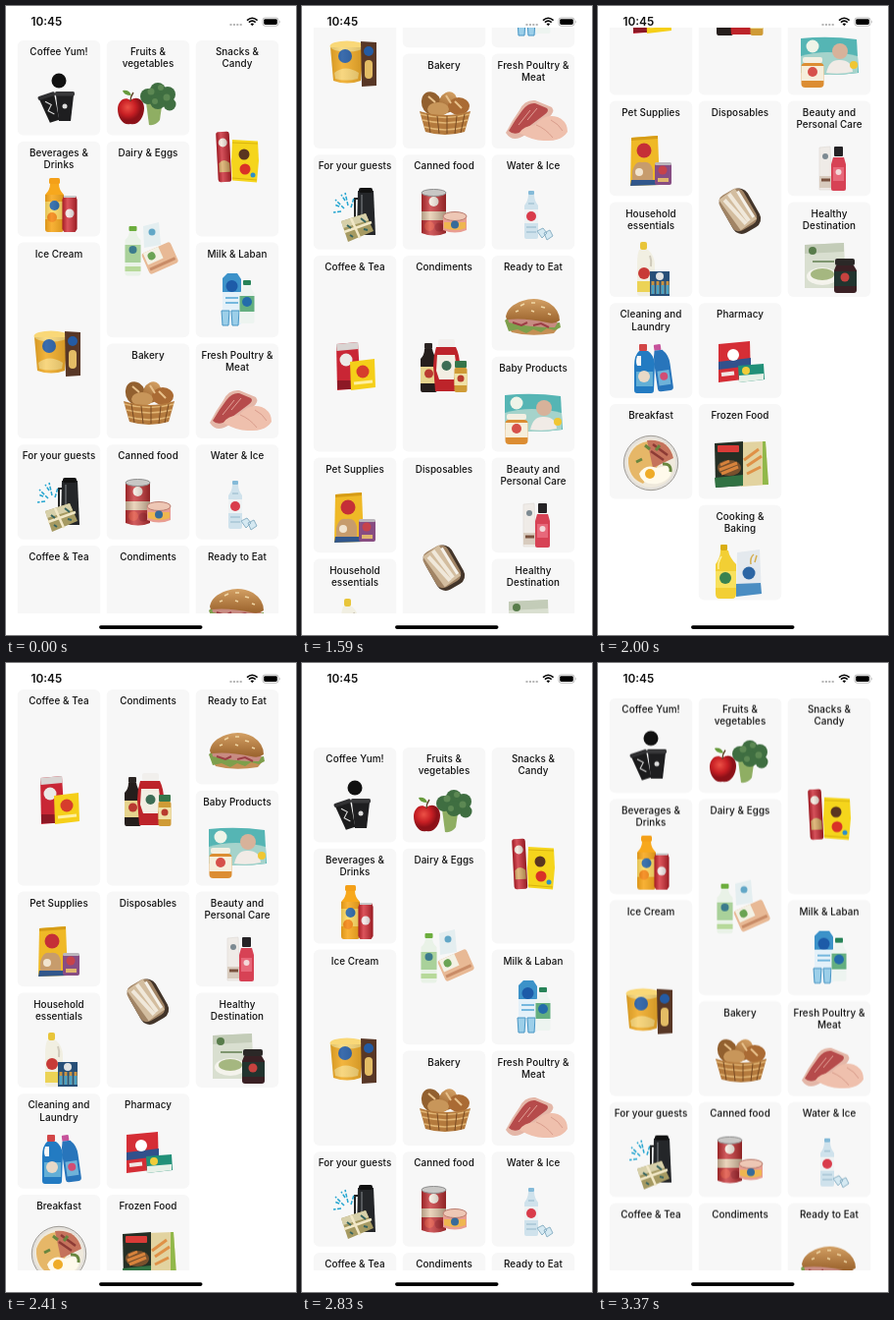
These frames come from a looping animation (296 px wide and 640 px high, 3490 ms). An HTML page:

```html
<!DOCTYPE html>
<html lang="en">
<head>
<meta charset="utf-8">
<title>Grocery categories</title>
<style>
html, body { margin: 0; width: 100%; height: 100%; overflow: hidden; background: #fff; }
svg { display: block; width: 296px; height: 640px; }
text { font-family: Inter, Roboto, sans-serif; fill: #111; }
#cards text { font-size: 9.9px; font-weight: 500; letter-spacing: .08px; text-anchor: middle; }
#cards rect { fill: #f7f7f7; }
#list { animation: scroll 3490ms step-end infinite; }
/* fling down, settle at the end, fling back past the top, spring home */
@keyframes scroll {
  0% { transform: translateY(0); }
  39.25% { transform: translateY(-12px); }
  42.4% { transform: translateY(-135px); }
  45.27% { transform: translateY(-295px); }
  48.42% { transform: translateY(-425px); }
  51.57% { transform: translateY(-528px); }
  54.44% { transform: translateY(-606px); }
  57.3% { transform: translateY(-658px); }
  60.17% { transform: translateY(-655px); }
  63.03% { transform: translateY(-634px); }
  66.18% { transform: translateY(-590px); }
  69.05% { transform: translateY(-522px); }
  72.2% { transform: translateY(-385px); }
  75.07% { transform: translateY(-220px); }
  78.22% { transform: translateY(-62px); }
  81.08% { transform: translateY(51px); }
  84.24% { transform: translateY(37px); }
  87.1% { transform: translateY(19px); }
  90.25% { transform: translateY(8px); }
  93.4% { transform: translateY(3px); }
  96.56%, 100% { transform: translateY(.6px); }
}
</style>
</head>
<body>
<svg viewBox="0 0 296 640">
<defs>
  <clipPath id="view"><rect y="22.7" width="296" height="594.5"/></clipPath>
  <linearGradient id="round"><stop stop-color="#000" stop-opacity=".22"/><stop offset=".35" stop-color="#fff" stop-opacity=".22"/><stop offset="1" stop-color="#000" stop-opacity=".28"/></linearGradient>
  <radialGradient id="apple" cx=".38" cy=".35"><stop stop-color="#ec5146"/><stop offset=".6" stop-color="#c81f24"/><stop offset="1" stop-color="#8c1118"/></radialGradient>
  <linearGradient id="crust" x2="0" y2="1"><stop stop-color="#d3a064"/><stop offset="1" stop-color="#9a622c"/></linearGradient>
</defs>
<g clip-path="url(#view)"><g id="list">
<g id="cards"></g>

<g id="upper">
  <!-- coffee -->
  <circle cx="54" cy="76" r="7.5" fill="#111"/>
  <g transform="rotate(-18 45 103)"><path d="M37 92h16l-3 26H40z" fill="#1b1b1c"/><rect x="36" y="89" width="18" height="4" rx="1.5" fill="#303032"/><path d="M42 96l5 5-5 5 5 5" fill="none" stroke="#ddd"/></g>
  <path d="M51 91h18l-3 26H54z" fill="#1e1e20"/><rect x="50" y="87" width="20" height="4.5" rx="1.5" fill="#38383a"/><circle cx="60" cy="102" r="2.5" fill="#ddd"/>

  <!-- fruits -->
  <path d="M143 98l17-3-3 21q-4 6-11 5z" fill="#8fae63"/>
  <g fill="#3f6e41"><circle cx="145" cy="92" r="8"/><circle cx="155" cy="86" r="8"/><circle cx="165" cy="90" r="8"/><circle cx="167" cy="100" r="6.5"/><circle cx="155" cy="97" r="8"/></g>
  <g fill="#5c8853"><circle cx="148" cy="87" r="3.5"/><circle cx="158" cy="83" r="3"/><circle cx="164" cy="93" r="3.5"/><circle cx="152" cy="97" r="3"/></g>
  <path d="M127 96c6-5 14-1 14 8s-6 18-14 16c-8 2-13-7-13-15s7-14 13-9z" fill="url(#apple)"/>
  <path d="M127 97q0-5 3-9" fill="none" stroke="#5b3b22" stroke-width="1.3"/><path d="M128 91q-8 0-9-5 7-1 9 5z" fill="#679a3c"/>

  <!-- snacks -->
  <g transform="rotate(-3 222 154)"><rect x="215.5" y="128" width="13.5" height="51" rx="2.5" fill="#c9202c"/><circle cx="222" cy="139" r="4.5" fill="#f4e8dc"/><path d="M217 160q5-6 11 0v9h-11z" fill="#d9a75d"/><rect x="215.5" y="128" width="13.5" height="51" rx="2.5" fill="url(#round)"/></g>
  <path d="M231 136l26 1.5 1 20-2 22-25-2-1-20z" fill="#f5d51c"/><circle cx="243" cy="151" r="5.5" fill="#5a3520"/><circle cx="244" cy="166" r="5.5" fill="#d93227"/><circle cx="252" cy="172" r="2.5" fill="#2d8fc8"/><path d="M231 139l26 1M231 175l25 2" stroke="#d9b40e"/>

  <!-- beverages -->
  <rect x="44" y="175" width="11" height="6" rx="1.5" fill="#f4a019"/>
  <path d="M45 181h9q0 6 5 11v35q0 3-3 3H43q-3 0-3-3v-35q5-5 5-11z" fill="#f7a81d"/><path d="M40 199h19v18H40z" fill="#ffda62"/><circle cx="49.5" cy="203" r="5" fill="#2764a6"/><circle cx="47" cy="215" r="5" fill="#f58714"/><path d="M40 192h19v35q0 3-3 3H43q-3 0-3-3z" fill="url(#round)" opacity=".5"/>
  <path d="M59 193h12l1.5 4v30l-2 3H59.5l-2-3v-30z" fill="#d2232d"/><circle cx="65" cy="211" r="4.5" fill="#f5e9e9"/><path d="M59 193h12l1.5 4v30l-2 3H59.5l-2-3v-30z" fill="url(#round)"/><path d="M59 194h12" stroke="#c8c8c8" stroke-width="2"/>

  <!-- dairy -->
  <path d="M140 224l16-4 2 23-17 3z" fill="#e4eef0"/><circle cx="149" cy="230" r="3.5" fill="#62a7c7"/>
  <rect x="125.5" y="224" width="8" height="5" rx="1" fill="#6cad3d"/><path d="M126 229h7q0 5 4.5 9v34q0 2.5-2.5 2.5h-11q-2.5 0-2.5-2.5v-34q4.5-4 4.5-9z" fill="#e9f2e7"/><path d="M121.5 243h16v18h-16z" fill="#a9d19a"/><circle cx="129.5" cy="248" r="4" fill="#3c7b8d"/><path d="M121.5 265h16v5h-16z" fill="#b7d99a"/>
  <g transform="rotate(-24 157 256)"><rect x="141" y="245" width="32" height="23" rx="3" fill="#e8b995"/><path d="M143 245h17v13h-17z" fill="#f3f1e4"/><circle cx="150" cy="251" r="4" fill="#6aa454"/><path d="M143 263h28" stroke="#c98c67" stroke-width="3"/></g>

  <!-- ice cream -->
  <path d="M29 337h34l-3 34q-14 5-28 0z" fill="#f0ab27"/><ellipse cx="46" cy="336" rx="17.5" ry="5.5" fill="#f9d878"/><circle cx="44" cy="346" r="7" fill="#245ba3"/><path d="M33 363q11-9 25 0l-1 6q-12 3-23 0z" fill="#f7d271"/><path d="M29 337h34l-3 34q-14 5-28 0z" fill="url(#round)" opacity=".5"/>
  <path d="M60 331l16 1v44l-15 1z" fill="#583726"/><circle cx="68" cy="341" r="5" fill="#245ba3"/><rect x="64" y="350" width="8" height="19" rx="4" fill="#e3bc65"/>

  <!-- milk -->
  <path d="M221 277l5-5h10l4 6v46h-19z" fill="#e4f1f9"/><path d="M221 277l5-5h10l4 6v13h-19z" fill="#3c92c9"/><circle cx="230.5" cy="285" r="6" fill="#1d5ba8"/><path d="M224 297h13M224 302h13" stroke="#75b8de" stroke-width="2"/><path d="M220 310h8l-1 15h-6zM230 310h8l-1 15h-6z" fill="#9ccfe9" stroke="#4795c4"/>
  <rect x="242" y="279" width="8" height="5" rx="1" fill="#278358"/><path d="M242 284h8q0 5 3.5 8v29q0 2-2 2h-11q-2 0-2-2v-29q3.5-3 3.5-8z" fill="#edf4f0"/><path d="M238.5 295h15v16h-15z" fill="#64af80"/><circle cx="246" cy="301" r="5" fill="#246caa"/>

  <!-- bakery -->
  <ellipse cx="132" cy="394" rx="10" ry="12" fill="#92602f" transform="rotate(-18 132 394)"/><ellipse cx="149" cy="393" rx="9" ry="11" fill="url(#crust)" transform="rotate(25 149 393)"/><ellipse cx="160" cy="397" rx="11" ry="9" fill="#aa6b34"/><ellipse cx="139" cy="400" rx="11" ry="7" fill="#c8965a"/><path d="M129 387l7 6M147 386l5 8M156 392l7 7" stroke="#e8c18b" stroke-width="2"/>
  <path d="M120 402q26 8 52 0l-6 21q-20 6-40 0z" fill="#b47a3d"/><path d="M121 405q25 7 50 0M123 411q24 6 46 0M125 418q21 6 42 0" fill="none" stroke="#e1b574" stroke-width="1.5"/><path d="M128 405l3 19M138 407l2 18M148 407v18M158 407l-2 18M166 405l-4 19" stroke="#794b23"/>

  <!-- poultry -->
  <path d="M208 424q6-12 14-23 5-11 16-10l17 7q4 5-4 11l-23 17q-13 9-20-2z" fill="#e4b7a8"/><path d="M211 422q7-12 14-21 6-8 13-7l12 5q3 3-3 7l-20 15q-10 7-16 1z" fill="#b64b4b"/><path d="M221 416l12-15M230 411l10-12" stroke="#e1a096"/>
  <path d="M222 424q4-7 16-8 10-12 23-8 10 4 10 15-6 10-22 9-12 1-27-8z" fill="#efc0ad"/><path d="M239 416q10 4 17 13M254 411q8 4 12 11" fill="none" stroke="#d99d8c"/>

  <!-- guests -->
  <path d="M57 483h16l2 45H56z" fill="#242629"/><rect x="58" y="480" width="14" height="5" rx="2" fill="#111"/><path d="M61 487v39" stroke="#55585c" stroke-width="2"/><path d="M57 491h-3v20" fill="none" stroke="#222" stroke-width="2"/>
  <path d="M43 501l-9-9M47 498l-3-13M50 500l3-10M40 504l-8 1M38 499l-5-2M44 493l-4-6" stroke="#25a5d0" stroke-width="1.5" stroke-dasharray="4 1.5"/>
  <path d="M40 514l25-8 8 18-26 11z" fill="#a69a62"/><path d="M40 514l25-8 3 7-26 8z" fill="#d7d0aa"/><path d="M50 511l9 20M43 525l28-10" stroke="#f2e8c7" stroke-width="2.5"/><path d="M46 518l4 3M60 511l5 4M63 522l4 1M49 528l3 2" stroke="#35635f" stroke-width="2"/>

  <!-- canned -->
  <path d="M122 485h25v41q-12 5-25 0z" fill="#c52f32"/><circle cx="134.5" cy="494" r="5" fill="#f2e8dc"/><path d="M122 504h25v9h-25z" fill="#e5c9aa"/><circle cx="130" cy="519" r="5" fill="#df4635"/><circle cx="140" cy="520" r="4.5" fill="#a91d24"/><path d="M122 485h25v41q-12 5-25 0z" fill="url(#round)"/><ellipse cx="134.5" cy="485" rx="12.5" ry="3.5" fill="#c8c7c5" stroke="#8e8e8e"/>
  <path d="M144 509h24v14q-12 5-24 0z" fill="#e99d91"/><ellipse cx="156" cy="509" rx="12" ry="4.5" fill="#eec7b5" stroke="#b97c70"/><path d="M145 515h22v6q-10 4-22 0z" fill="#efb650"/><circle cx="156" cy="517.5" r="4" fill="#376b9a"/>

  <!-- water -->
  <rect x="231" y="483" width="6" height="4" rx="1" fill="#84bad8"/><path d="M231 487h6q0 6 4 11v32q0 2-2 2h-10q-2 0-2-2v-32q4-5 4-11z" fill="#cfe2ec"/><path d="M227 502h14v14h-14z" fill="#eff2f3"/><circle cx="234" cy="509" r="5" fill="#d93c4b"/><path d="M229 520h10M229 525h10M231 496h6" stroke="#93b7ca"/>
  <path d="M240 524l6-3 4 5-5 5zM247 526l6-3 3 6-6 4z" fill="#d5e9f2" stroke="#8cb2c6"/>
</g>

<g id="lower" transform="translate(0 528)">
  <!-- coffee and tea -->
  <path d="M35 111l22-2 3 47-24 2z" fill="#c92635"/><path d="M35 111l22-2 .5 7-22 2z" fill="#d9d4d2"/><circle cx="45" cy="127" r="6.5" fill="#ece9e6"/><path d="M36 148h20v9H36z" fill="#8d1825"/>
  <path d="M49 129l25-3 1 29-25 3z" fill="#f5cf19"/><circle cx="62" cy="139" r="6.5" fill="#d63d2c"/><path d="M53 151l19-2" stroke="#fff0a0" stroke-width="3"/>

  <!-- condiments -->
  <rect x="125" y="110" width="8" height="6" rx="1" fill="#2b2523"/><path d="M125 116h8q1 6 5 10v31q0 3-2 3h-13q-2 0-2-3v-31q4-4 4-10z" fill="#251e1c"/><path d="M121 134h17v17h-17z" fill="#e6d48e"/><circle cx="129.5" cy="141" r="4.5" fill="#b93a31"/>
  <rect x="139" y="106" width="17" height="8" rx="2" fill="#f1efec"/><path d="M137 114h20q4 8 4 19l-2 26h-23l-2-26q0-10 3-19z" fill="#bd242a"/><path d="M138 122h18l2 16-3 9h-15l-3-9z" fill="#f2eee3"/><circle cx="147.5" cy="133" r="5" fill="#3d6d55"/>
  <rect x="156" y="128" width="12" height="7" rx="1" fill="#35764a"/><rect x="155.5" y="135" width="13" height="25" rx="2" fill="#cf9b36"/><rect x="155.5" y="141" width="13" height="12" fill="#efe1a6"/><circle cx="162" cy="146" r="3.5" fill="#b83b2e"/>

  <!-- sandwich -->
  <path d="M209 91q28-6 53 3l-5 6q-24 4-43-1z" fill="#c48f54"/><path d="M207 87q5-5 11-3 7 4 12 1 8 5 14 2 9 4 19 2l1 5-6 3-8-2-6 4-8-3-7 4-9-4-9 2z" fill="#7d9f4c"/><path d="M210 84q28-3 51 5l-3 5q-28 0-47-5z" fill="#c88b82"/><path d="M215 89l9 3 6-3M236 92l8-2 8 4" fill="none" stroke="#9c3e45" stroke-width="2"/><path d="M208 83q2-11 17-16 14-5 27 2 11 7 11 18-5 4-13 2-22-5-41-3z" fill="url(#crust)"/><path d="M223 72l4-2M234 69h4M244 73l4 1M251 80l3 1M218 78l3-1M234 77l3 1" stroke="#f0d6a4" stroke-width="1.5"/>

  <!-- baby -->
  <path d="M207 163q29-3 57 1l2 34q-29 4-59 0z" fill="#55b5b4"/><path d="M207 181q26-8 58 0v17q-28 4-58 0z" fill="#a5d3cb"/><circle cx="219" cy="171" r="6.5" fill="#eef4e8"/><circle cx="247" cy="176" r="8" fill="#d7b29a"/><path d="M233 198q3-14 14-13 12 0 13 12-13 3-27 1z" fill="#f1ebe6"/><circle cx="261" cy="190" r="4" fill="#f0c632"/>
  <rect x="209" y="182" width="20" height="6" rx="2" fill="#f3efe2"/><rect x="207.5" y="188" width="23" height="25" rx="4" fill="#dc8d32"/><path d="M207.5 191h23v15h-23z" fill="#f6eedb"/><circle cx="219" cy="197" r="5" fill="#d6514a"/>

  <!-- pets -->
  <path d="M34 264l27-2 2 50-30 1z" fill="#efb927"/><path d="M34 264l27-2v3l-27 2z" fill="#d69c16"/><circle cx="47" cy="277" r="7.5" fill="#c52f37"/><path d="M35 298q3-11 10-9 9-2 11 8v10H35z" fill="#c79c6c"/><circle cx="42" cy="299" r="4" fill="#f1e4cf"/><path d="M34 307h28l1 5-30 1z" fill="#31578c"/>
  <rect x="58" y="290" width="17" height="22" rx="2" fill="#874d83"/><circle cx="66" cy="297" r="4.5" fill="#c6434b"/><path d="M61 307h11" stroke="#dfb66d" stroke-width="4"/><rect x="58" y="289" width="17" height="3" rx="1.5" fill="#bbb6bc"/>

  <!-- disposables -->
  <g transform="rotate(-30 145 339)"><rect x="130" y="317" width="31" height="44" rx="10" fill="#43352a"/><rect x="130" y="316" width="28" height="41" rx="8" fill="#a18465"/><path d="M132 318l20-2 4 38-20 2z" fill="#d3bd9f"/><path d="M137 321l7 32M144 318l4 34" stroke="#f0e8da" stroke-width="4"/><path d="M153 320l1 31" stroke="#f5f1e9" stroke-width="3"/></g>

  <!-- beauty -->
  <path d="M226 274l11-1 2 44h-13z" fill="#efebe7" stroke="#ddd8d3" stroke-width=".6"/><circle cx="232" cy="283" r="3" fill="#7d8a92"/><path d="M226 303h13v12h-13z" fill="#d8cbbe"/><path d="M228 307h9" stroke="#79513d" stroke-width="3"/>
  <rect x="241" y="273" width="9" height="10" rx="1" fill="#252326"/><path d="M240 284h11l2 7v25q0 2-2 2h-11q-2 0-2-2v-25z" fill="#d74255"/><path d="M240 294h11v14h-11z" fill="#e7687a"/><circle cx="245.5" cy="299" r="3" fill="#f3d7d9"/>

  <!-- healthy -->
  <path d="M211 373l40-2 2 46h-42z" fill="#d9dfd0"/><path d="M211 373l40-2v9l-40 2z" fill="#c3ccb8"/><circle cx="219" cy="379" r="4" fill="#587c4b"/><ellipse cx="229" cy="405" rx="16" ry="9" fill="#f4f3ec"/><ellipse cx="229" cy="403" rx="12" ry="6" fill="#a5b780"/><path d="M219 390h22" stroke="#7f9670" stroke-width="2"/>
  <rect x="242" y="387" width="20" height="7" rx="2" fill="#2b2827"/><path d="M243 394h18l3 5v20q0 3-3 3h-17q-3 0-3-3v-20z" fill="#3a2024"/><path d="M241 400h23v15h-23z" fill="#22342f"/><circle cx="252" cy="406" r="4.5" fill="#c7423f"/>

  <!-- household -->
  <rect x="43" y="370" width="7" height="8" rx="2" fill="#e8c53a"/><path d="M42 378h9q6 5 7 14v30q0 3-3 3H43q-3 0-3-3v-31q0-8 2-13z" fill="#f1efe2"/><path d="M40 410h18v11H40z" fill="#ecd355"/><circle cx="47" cy="402" r="6" fill="#c83b37"/><path d="M53 384q2 5 1 11" fill="none" stroke="#cfcabb" stroke-width="2"/>
  <path d="M53 400h20v25H53z" fill="#274f78"/><circle cx="63" cy="405" r="4" fill="#e2e4e4"/><path d="M56 410v13M61 410v13M66 410v13M71 410v13" stroke="#c99342" stroke-width="3"/><path d="M56 414v9M61 414v9M66 414v9M71 414v9" stroke="#4aa1c6" stroke-width="3"/>

  <!-- cleaning -->
  <rect x="42" y="474" width="8" height="7" rx="1" fill="#d24647"/><path d="M42 481h9q6 4 7 13l-1 27q0 3-3 3H40q-3 0-3-3v-25q0-11 5-15z" fill="#237bc2"/><path d="M40 486q-2 6 0 10h4v-10z" fill="#f7f7f7"/><path d="M39 502h17v15H39z" fill="#63afd6"/><circle cx="47" cy="507" r="6" fill="#e9d9c7"/>
  <g transform="rotate(-8 65 498)"><rect x="60" y="474" width="7" height="6" rx="1" fill="#c6539b"/><path d="M60 480h8q6 6 6 15v24q0 3-3 3h-10q-3 0-3-3v-25q0-8 2-14z" fill="#2875bb"/><path d="M60 501h12v15H60z" fill="#6fb2d8"/><circle cx="66" cy="507" r="4" fill="#d24d74"/></g>

  <!-- pharmacy -->
  <path d="M123 474l32-3 1 38-33 4z" fill="#d52e36"/><path d="M123 492l33-4v8l-33 4z" fill="#31518c"/><circle cx="138" cy="485" r="6" fill="#fff"/><path d="M126 505l13-1.5" stroke="#f0e6e4" stroke-width="4"/>
  <path d="M143 496l26-2 1 16-26 3z" fill="#219078"/><path d="M144 506l25-2v6l-25 3z" fill="#e6f0e7"/><circle cx="151" cy="501" r="4" fill="#f0cc39"/>

  <!-- breakfast -->
  <circle cx="54" cy="595" r="27.7" fill="#e3e0db" stroke="#8b8780" stroke-width=".8"/><circle cx="54" cy="595" r="25" fill="#efe9dc"/><path d="M31 590q6-17 23-17l8 24-16 19q-16-6-15-26z" fill="#e6b768"/><path d="M50 572q22-2 27 18l-21 10z" fill="#c5735c"/><path d="M56 576l15 11M54 583l13 9" stroke="#8d3b35" stroke-width="2.5"/><path d="M42 606q6-11 18-6l14-3q4 15-13 19-16 2-19-10z" fill="#fffaeb"/><circle cx="53" cy="606" r="5" fill="#efac28"/><path d="M66 596q9-1 8 8M48 577l5 4M39 594l6-3M59 582l4-5" fill="none" stroke="#68863e" stroke-width="3"/>

  <!-- frozen -->
  <path d="M143 574l28-1 3 44-28 2z" fill="#e2d3a0"/><path d="M168 573l3 0 3 44h-6z" fill="#91b84a"/><path d="M149 592l15-11M152 598l15-10M152 606l14-7" stroke="#df9147" stroke-width="3"/><path d="M119 575l29-2v45l-28 2z" fill="#252f25"/><path d="M119 610l29-3v11l-28 2z" fill="#317243"/><rect x="122" y="577" width="22" height="7" rx="1" fill="#d93b37"/><ellipse cx="134" cy="600" rx="12" ry="8" fill="#77502d"/><path d="M124 602l18-7M126 606l17-7M125 597l9-4" stroke="#d7833c" stroke-width="3"/>

  <!-- cooking -->
  <path d="M142 686l23-3 2 45-26 3z" fill="#e4e9ee"/><path d="M141 718l25-1 1 11-26 3z" fill="#4a8dc2"/><circle cx="154" cy="707" r="6.5" fill="#2d66a4"/><path d="M156 698q-1-7 3-10M160 696l2-7" fill="none" stroke="#d4ae50" stroke-width="1.5"/>
  <rect x="125" y="678" width="7" height="6" rx="1" fill="#d9ae13"/><path d="M125 684h8q1 7 8 14v30q0 5-4 5h-13q-4 0-4-5v-30q5-7 5-14z" fill="#f2cf34"/><path d="M120 705h21v17h-21z" fill="#f8e15e"/><circle cx="130" cy="712" r="6" fill="#388250"/><path d="M126 690q-4 6-3 13" fill="none" stroke="#fff1a1" stroke-width="1.5"/>
</g>
</g></g>

<g id="status">
  <text x="25.5" y="20.2" font-size="11.8" font-weight="600">10:45</text>
  <path d="M228.5 19h12.5" stroke="#b5b5b5" stroke-width="1.8" stroke-dasharray="2 1.4"/>
  <g fill="none" stroke="#000" stroke-width="1.6"><path d="M246 14.6q5.3-4.7 10.6 0"/><path d="M247.9 16.7q3.4-3 6.8 0"/></g><path d="M249.5 18.3q1.8-1.5 3.6 0l-1.8 1.9z"/>
  <rect x="262" y="12" width="16" height="8.2" rx="2.4" fill="none" stroke="#a5a5a5" stroke-width=".8"/><rect x="263.2" y="13.2" width="13.6" height="5.8" rx="1.4"/><path d="M279.2 14.8q1.3 1.3 0 2.7z" fill="#999"/>
</g>
<rect x="95" y="630.3" width="105.5" height="3.6" rx="1.8"/>
</svg>
<script>
// One list per column; a leading "+" marks a double-height card, "|" a line break.
const columns = [
  ["Coffee Yum!", "Beverages &|Drinks", "+Ice Cream", "For your guests", "+Coffee & Tea",
   "Pet Supplies", "Household|essentials", "Cleaning and|Laundry", "Breakfast"],
  ["Fruits &|vegetables", "+Dairy & Eggs", "Bakery", "Canned food", "+Condiments",
   "+Disposables", "Pharmacy", "Frozen Food", "Cooking &|Baking"],
  ["+Snacks &|Candy", "Milk & Laban", "Fresh Poultry &|Meat", "Water & Ice", "Ready to Eat",
   "Baby Products", "Beauty and|Personal Care", "Healthy|Destination"]
];
const pitch = 102.8, cardW = 84.6, cardH = 96.6;
const cards = document.getElementById("cards");

function add(tag, attrs, content = "") {
  const node = document.createElementNS("http://www.w3.org/2000/svg", tag);
  for (const key in attrs) node.setAttribute(key, attrs[key]);
  node.textContent = content;
  cards.append(node);
}

columns.forEach((titles, col) => {
  const x = 11.7 + col * 91;
  let y = 35;
  for (const title of titles) {
    const extra = title[0] === "+" ? pitch : 0;
    add("rect", { x, y, width: cardW, height: cardH + extra, rx: 6 });
    title.replace("+", "").split("|").forEach((line, i) =>
      add("text", { x: x + cardW / 2, y: y + 15.2 + i * 12.2 }, line));
    y += pitch + extra;
  }
});
</script>
</body>
</html>
```
